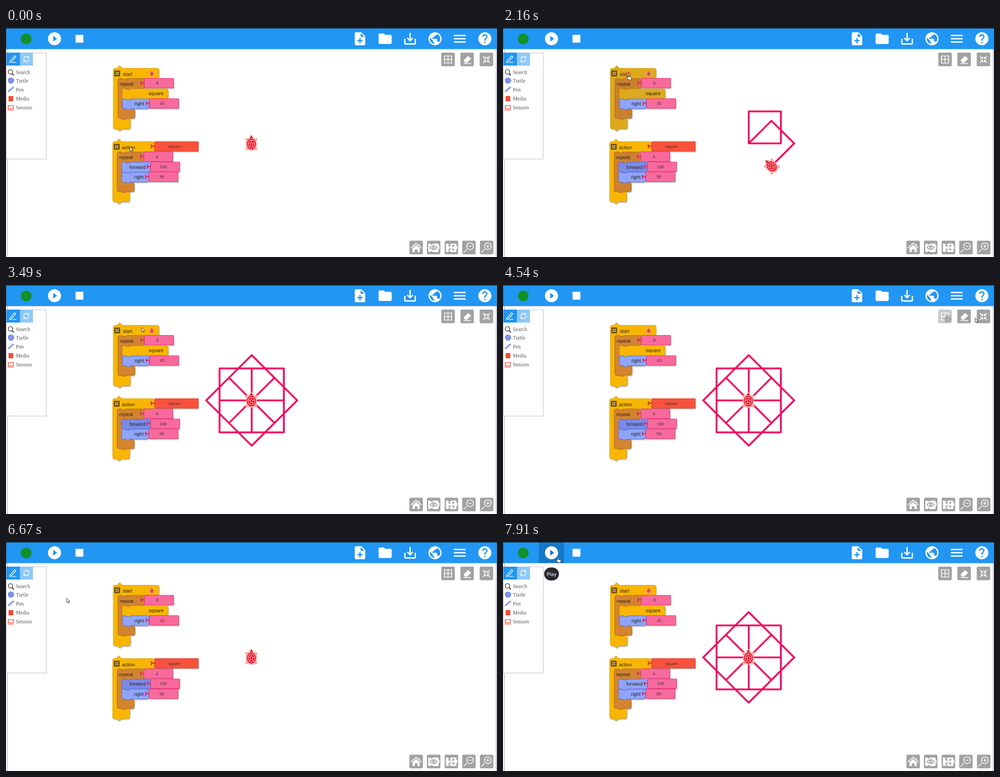
Animation, 1093 px wide and 512 px high, one loop 8.07 s. Source, as an HTML page:

```html
<!DOCTYPE html>
<html lang="en">
<head>
<meta charset="utf-8">
<title>Turtle squares</title>
<style>
  html, body { margin: 0; width: 100%; height: 100%; overflow: hidden; background: #fff; }
  svg { display: block; width: 1093px; height: 512px; }
  .label { font: 10.9px "Liberation Sans", Arial, sans-serif; fill: #2a2418; }
  .value { font: 10.8px "Liberation Serif", serif; fill: #40303a; text-anchor: middle; }
  .item { font: 11.6px "Liberation Serif", serif; fill: #555; }
  .tip { font: 11.5px Roboto, sans-serif; fill: #fff; text-anchor: middle; }
  #blocks { filter: drop-shadow(1px 2px 1px rgba(0, 0, 0, .28)); }
  .line { fill: none; stroke: #fff; stroke-width: 1.7; }
</style>
</head>
<body>
<svg id="stage" viewBox="0 0 1093 512" xmlns="http://www.w3.org/2000/svg">
  <defs>
    <g id="turtle">
      <g fill="#f9aaa4" stroke="#f9aaa4" stroke-width="2" stroke-linejoin="round">
        <path d="M0-18L5-9H-5z"/>
        <ellipse cy="2" rx="11.5" ry="14"/>
        <circle cx="-10" cy="-8" r="2.4"/><circle cx="10" cy="-8" r="2.4"/>
        <circle cx="-10" cy="12.5" r="2.4"/><circle cx="10" cy="12.5" r="2.4"/>
      </g>
      <path d="M0-17L3.6-11H-3.6z" fill="#e8102e"/>
      <ellipse cy="2" rx="10" ry="12" fill="#e8102e"/>
      <ellipse cy="2" rx="7.3" ry="8.8" fill="none" stroke="#f9aaa4" stroke-width="1.5"/>
      <path id="shell" fill="none" stroke="#f9aaa4" stroke-width="1.3"/>
    </g>
  </defs>
  <rect width="1093" height="512" fill="#fff"/>
  <rect x="2" y="47" width="2" height="465" fill="#c9c9dc"/>
  <rect x="1090" y="47" width="3" height="465" fill="#d0d0e2"/>

  <path id="trail" fill="none" stroke="#f5055f" stroke-width="4" stroke-linejoin="round" stroke-linecap="round"/>
  <use id="mover" href="#turtle"/>

  <g id="palette">
    <rect x=".5" y="55.5" width="89" height="237.5" fill="#fff" stroke="#b9b9c0"/>
    <rect x="1" y="55" width="30" height="29" fill="#2196f3"/>
    <rect x="31" y="55" width="29" height="29" fill="#8ec8f8"/>
    <path d="M9 74L19 62l3 2.500L12 76l-4 1zM14 78q5-2 9-1" class="line" style="stroke-width:1.4"/>
    <path d="M39.500 69a6 6 0 0 1 10.500-3.500M51 70a6 6 0 0 1-10.500 3.500" class="line"/>
    <path d="M51.500 62.500v5h-5zM39 76.500v-5h5z" fill="#fff"/>
    <circle cx="10" cy="98" r="5" fill="#fff" stroke="#555" stroke-width="1.7"/>
    <path d="M13.500 102l4 4" stroke="#555" stroke-width="2.600"/>
    <path d="M5 114l5-3 6 2 2 5-3 5-7 1-3-5z" fill="#8093f0" stroke="#6376d8"/>
    <path d="M4 143l2-4L16 131l2 2L8 142z" fill="#8fa3ff" stroke="#7083dd" stroke-width=".7"/>
    <rect x="6" y="152" width="10" height="12" rx="1" fill="#f9523c"/>
    <path d="M5 155h12M5 158.500h12M5 162h12" stroke="#d83a20" stroke-width=".8"/>
    <path d="M5 173.500h11.500v7H5zM3.500 183.500h14" fill="none" stroke="#f9523c" stroke-width="1.7"/>
    <g id="items"></g>
  </g>

  <g id="blocks"></g>
  <g id="buttons"></g>
  <g id="gridHover"><rect x="969" y="55" width="30" height="31" rx="3" fill="#fff" opacity=".42"/>
    <circle cx="990" cy="76" r="8" fill="#777" opacity=".45"/></g>
  <circle id="ripple" cx="1027" cy="71" fill="#a5a5ae"/>
  <text id="clean" x="1031" y="102" class="tip" style="font-size:9.3px;fill:#222">Clean</text>

  <rect y="47" width="1093" height="2" fill="#000" opacity=".1"/>
  <rect width="1093" height="47" fill="#2196f3"/>
  <rect id="hover" x="80" y="1" width="56" height="46" fill="#1678c8"/>
  <rect width="1093" height="1" fill="#111"/><rect width="1" height="47" fill="#1a5b91"/>
  <circle cx="45" cy="24.500" r="12" fill="#12902a"/>
  <g id="icons" fill="#fff"></g>
  <g id="play"><rect x="91.500" y="57" width="33" height="29" rx="14.500" fill="#2a2831"/>
    <text x="108" y="75.500" class="tip">Play</text></g>

  <circle id="ring" fill="#f9a08a" fill-opacity=".35" stroke="#e8402a" stroke-width="2"/>
  <g id="cursor" stroke="#222" stroke-width=".9" stroke-linejoin="round" fill="#fff">
    <path id="arrow" d="M0 0V9.500L2.300 7.500 4 11.200 5.500 10.500 3.900 7H6.800z"/>
    <path id="hand" d="M-1 1.200Q0-.6 1.100 1.200V5L6 5.800Q7.200 6.200 7 8L6 12H.5L-2.800 8Q-3-.2-1 6.800z"/>
  </g>
</svg>

<script>
const LOOP = 8070, SIDE = 71.6, HOME = [547, 258];
const $ = id => document.getElementById(id);
const add = (id, html) => $(id).insertAdjacentHTML('beforeend', html);

// --- header icons on a 24 unit grid: centre x, path, id
const DISC = 'M12 2C6.480 2 2 6.480 2 12s4.480 10 10 10 10-4.480 10-10S17.520 2 12 2z';
const ICONS = [
  [108, DISC + 'm-2 14.500v-9l6 4.500-6 4.500z'],
  [163.5, 'M6 6h12v12H6z', 'stop'],
  [788, 'M14 2H6c-1.100 0-2 .9-2 2v16c0 1.100.9 2 2 2h12c1.100 0 2-.9 2-2V8l-6-6zm2 14h-3v3h-2v-3H8v-2h3v-3h2v3h3v2zm-3-7V3.500L18.500 9H13z'],
  [844, 'M10 4H4c-1.100 0-2 .9-2 2v12c0 1.100.9 2 2 2h16c1.100 0 2-.9 2-2V8c0-1.100-.9-2-2-2h-8l-2-2z'],
  [899.5, 'M19 12v7H5v-7H3v7c0 1.100.9 2 2 2h14c1.100 0 2-.9 2-2v-7h-2zm-6 .67l2.590-2.580L17 11.500l-5 5-5-5 1.410-1.410L11 12.670V3h2z'],
  [955, DISC + 'm-1 17.930c-3.950-.49-7-3.850-7-7.930 0-.62.08-1.210.21-1.790L9 15v1c0 1.100.9 2 2 2v1.930zm6.900-2.540c-.26-.81-1-1.390-1.900-1.390h-1v-3c0-.55-.45-1-1-1H8v-2h2c.55 0 1-.45 1-1V7h2c1.100 0 2-.9 2-2v-.41c2.930 1.190 5 4.060 5 7.410 0 2.080-.8 3.970-2.100 5.390z'],
  [1010, 'M3 18h18v-2H3v2zm0-5h18v-2H3v2zm0-7v2h18V6H3z'],
  [1066, DISC + 'm1 17h-2v-2h2v2zm2.070-7.750l-.9.92C13.450 12.900 13 13.500 13 15h-2v-.5c0-1.100.45-2.100 1.170-2.830l1.240-1.260c.37-.36.59-.86.59-1.410 0-1.100-.9-2-2-2s-2 .9-2 2H8c0-2.210 1.790-4 4-4s4 1.790 4 4c0 .88-.36 1.680-.93 2.250z'],
];
for (const [x, d, id = ''] of ICONS)
  add('icons', `<path id="${id}" fill-rule="evenodd" transform="translate(${x - 17.5} 6.500) scale(1.460)" d="${d}"/>`);

// --- grey canvas buttons: centre, line art, solid art
const inward = 'M-8-8l6 6m0-4.500v4.500h-4.500M8-8l-6 6m0-4.500v4.500h4.500M-8 8l6-6m0 4.500v-4.500h-4.500M8 8l-6-6m0 4.500v-4.500h4.500';
const outward = 'M-1.500-1.500l-4-4m0 3v-3h3M1.500-1.500l4-4m0 3v-3h-3M-1.500 1.500l-4 4m0-3v3h3M1.500 1.500l4 4m0-3v3h-3';
const lens = 'M-5 4L-12 11M-5-3a7.500 7.500 0 1 0 15 0a7.500 7.500 0 1 0-15 0M-1-3h7';
const slab = 'M-12-9h5v2h5v-2H9q2 0 2 2v3h2v7h-2v5q0 2-2 2H-2v-2h-5v2h-3q-2 0-2-2z';
const BUTTONS = [
  [984, 70.5, 'M-8-8H8V8H-8zM0-8V8M-8 0H8', ''],
  [1026.5, 70.5, 'M-8 9H9', 'M-8 2L2-8 9-2 0 7h-5z'],
  [1069.5, 70.5, inward, ''],
  [913, 491, 'M-12 1L0-10 12 1M7-8v4', 'M-8 1L0-6 8 1V10H3V4h-6v6h-5z'],
  [952, 491, '', slab],
  [991.5, 491, '', slab],
  [1030.5, 491, lens, ''],
  [1070, 491, lens + 'M2.500-6.500v7', ''],
];
for (const [x, y, line, solid] of BUTTONS)
  add('buttons', `<g transform="translate(${x} ${y})"><rect x="-15" y="-15.500" width="30" height="30.500" rx="3" fill="#a2a2a2"/>
    <path d="${solid}" fill="#fff"/><path d="${line}" class="line"/></g>`);
add('buttons', `<g fill="none" stroke="#909090" stroke-width="1.500"><path d="M944 491q8-9 16 0q-8 9-16 0z"/>
  <circle cx="952" cy="491" r="2.300"/><path transform="translate(991.500 491)" d="${outward}"/></g>`);

['Search', 'Turtle', 'Pen', 'Media', 'Sensors'].forEach((s, i) =>
  add('items', `<text class="item" x="22" y="${i ? 102 + i * 20 : 103}">${s}</text>`));

// --- program blocks
const GOLD = ['#f8b603', '#d79b08'], BROWN = ['#d4842f', '#a9621c'], BLUE = ['#8fa5fb', '#5668cc'],
      PINK = ['#f96a9c', '#e3256d'], RED = ['#f9523c', '#d5301d'];
const shape = (id, d, [fill, edge]) =>
  add('blocks', `<path id="${id}" d="${d}" fill="${fill}" stroke="${edge}" stroke-width=".9"/>`);
const label = (x, y, s, kind = 'label') => add('blocks', `<text class="${kind}" x="${x}" y="${y}">${s}</text>`);

function clamp(id, x, y, w, mouth, foot, colour, tips) {
  const top = tips ? `H${x + 8}l6-6 6 6` : `H${x + 10}v2h9v-2`;
  const end = tips ? `H${x + 20}l-6 4.500-6-4.500` : `H${x + 19}v2h-9v-2`;
  shape(id, `M${x + 4} ${y}${top}H${x + w - 4}q4 0 4 4V${y + 18.5}q0 4-4 4H${x + 29}v2h-9v-2H${x + 14}q-4 0-4 4
    V${y + mouth - 4}q0 4 4 4H${x + 34}q4 0 4 4V${y + foot - 4}q0 4-4 4${end}H${x + 4}q-4 0-4-4V${y + 4}q0-4 4-4z`, colour);
}
function step(id, x, y, w, colour) {
  shape(id, `M${x + 4} ${y}h5v2h9v-2H${x + w - 4}q4 0 4 4v14q0 4-4 4H${x + 18}v2h-9v-2h-5q-4 0-4-4v-14q0-4 4-4z`, colour);
}
function value(x, y, w, s, textX, colour = PINK) {
  shape('', `M${x} ${y}h${w}v21.500h-${w}z`, colour);
  add('blocks', `<path d="M${x - 8.5} ${y + 6}v9h2.500v-3.500h6v-2.500h-6v-3z" fill="${colour[1]}"/>`);
  label(textX, y + 14, s, 'value');
}
function fold(x, y) {
  add('blocks', `<rect x="${x}" y="${y}" width="13" height="13" fill="#6a4d10"/>
    <path transform="translate(${x + 6.5} ${y + 6.5}) scale(.55)" class="line" style="stroke:#f3dfa8" d="${inward}"/>`);
}
clamp('start', 239, 90, 101.5, 113, 135.5, GOLD, true);
clamp('loop1', 249, 113, 58.5, 68, 89, BROWN);
step('call', 259, 136, 102, GOLD);
step('turn', 259, 158.5, 59.5, BLUE);
fold(241, 95);
add('blocks', '<use href="#turtle" transform="translate(324.500 102) scale(.36)"/>');
value(308, 112.5, 65, '8', 337);
value(319.5, 158, 65, '45', 348);
label(260, 106.5, 'start'); label(253, 129, 'repeat'); label(317.5, 150, 'square'); label(286, 173, 'right');

clamp('action', 237.5, 254, 92.5, 112, 134.5, GOLD, true);
clamp('loop2', 247.5, 277.5, 58.5, 67.5, 88.5, BROWN);
step('ahead', 257.5, 300, 64, BLUE);
step('', 257.5, 322.5, 59.5, BLUE);
fold(240, 259);
value(331, 254, 97, 'square', 375, RED);
value(307, 277, 64.5, '4', 336);
value(322, 299.5, 64.5, '100', 350);
value(318, 322, 65, '90', 347);
label(258, 271, 'action'); label(252, 293, 'repeat'); label(274.5, 314.5, 'forward'); label(285, 337, 'right');

let spokes = '';
for (let i = 0; i < 5; i++) {
  const a = i * Math.PI * .4, p = (r, b = a) => [r * Math.sin(b), 2 - r * 1.15 * Math.cos(b)];
  spokes += `M${p(3.4)}L${p(3.4, a + Math.PI * .4)}M${p(3.4)}L${p(7)}`;
}
$('shell').setAttribute('d', spokes);

// --- timing
// id, from, to, colour while lit
const LIT = [
  ['action', 60, 720, '#dcaa1c'], ['ahead', 232, 7150, '#7a8ae8'], ['turn', 1280, 1560, '#7a8ae8'],
  ['call', 1430, 1640, '#dcaa1c'], ['call', 2000, 2740, '#dcaa1c'], ['start', 1680, 2740, '#dcaa1c'],
  ['loop1', 1560, 2740, '#ca7f2e'], ['loop2', 2005, 2700, '#cd802e'],
];
const REST = {};
for (const [id] of LIT) REST[id] = $(id).getAttribute('fill');

// start, ms per side, sides, end of display, sides already there
const RUNS = [[232, 12, 4, 2005, 0], [2005, 21, 32, 5280, 4], [7172, 20.5, 32, LOOP, 0]];
const CLICKS = [[60, 276, 266], [1960, 278, 104], [7150, 118, 29]];
// time, x, y
const PATH = [
  [0, 276, 266], [950, 276, 266], [1080, 279, 244], [1250, 286, 192], [1400, 289, 149], [1580, 284, 121],
  [1730, 280, 108], [1850, 279, 104], [3060, 279, 104], [3240, 278, 98], [3400, 278, 98], [3520, 310, 94],
  [3800, 590, 84], [4050, 840, 78], [4180, 908, 79], [4360, 985, 75], [4540, 1051, 74], [4640, 1051, 76],
  [4900, 1024, 82], [5830, 1024, 82], [5960, 985, 94], [6250, 600, 138], [6500, 230, 156], [6610, 143, 150],
  [6780, 121, 82], [6950, 118, 29], [7450, 118, 28], [7700, 122, 34], [LOOP, 122, 34],
];

const within = (t, a, b) => t >= a && t < b;
const ramp = (t, a, b) => Math.min(1, Math.max(0, (t - a) / (b - a)));
const show = (id, on) => { $(id).style.display = on ? '' : 'none'; };

function pointer(t) {
  const i = PATH.findIndex(p => p[0] > t), [a, x, y] = PATH[i - 1], [b, u, v] = PATH[i];
  const k = (t - a) / (b - a);
  return [x + (u - x) * k, y + (v - y) * k];
}

function walk(sides) {
  let [x, y] = HOME, d = `M${x} ${y}`;
  for (let i = 0; i < sides; i++) {
    const a = (45 * (i >> 2) + 90 * (i % 4)) * Math.PI / 180;
    x += SIDE * Math.sin(a);
    y -= SIDE * Math.cos(a);
    d += `L${x.toFixed(2)} ${y.toFixed(2)}`;
  }
  const last = sides - 1;
  const heading = sides && sides < 32 ? 45 * (last >> 2) + 90 * (last % 4 + 1) : 0;
  return { x, y, heading, d };
}

function draw(t) {
  const run = RUNS.find(r => within(t, r[0], r[3]));
  const sides = run ? Math.min(run[2], Math.floor((t - run[0]) / run[1])) : 0;
  const pos = walk(sides), drawn = run ? Math.max(sides, run[4]) : 0;
  $('trail').setAttribute('d', drawn ? walk(drawn).d : '');
  $('mover').setAttribute('transform', `translate(${pos.x - .8} ${pos.y - .5}) rotate(${pos.heading})`);

  const playing = within(t, 7150, 7840);
  show('blocks', !playing);
  show('palette', !playing);
  $('stop').setAttribute('fill', playing ? '#f8203c' : '#fff');
  $('blocks').setAttribute('transform', `translate(0 ${t >= 5280 ? 6.5 : 0})`);
  for (const id in REST) {
    const lit = LIT.find(l => l[0] === id && within(t, l[1], l[2]));
    $(id).setAttribute('fill', lit ? lit[3] : REST[id]);
  }

  show('hover', t >= 6920);
  show('play', t >= 6980);
  show('clean', within(t, 4850, 5950));
  $('gridHover').setAttribute('opacity', ramp(t, 4290, 4400) * (1 - ramp(t, 4560, 4800)));
  $('ripple').setAttribute('r', 20 * ramp(t, 5220, 5420));
  $('ripple').setAttribute('opacity', .5 * (1 - ramp(t, 5800, 6050)));

  const click = CLICKS.find(c => within(t, c[0], c[0] + 690));
  show('ring', click);
  if (click) {
    const k = (t - click[0]) / 690;
    $('ring').setAttribute('cx', click[1]);
    $('ring').setAttribute('cy', click[2]);
    $('ring').setAttribute('r', 4 + 5 * k);
    $('ring').setAttribute('opacity', 1 - k * .75);
  }

  const [x, y] = pointer(t);
  const hand = within(t, 90, 3400) || t >= 6860;
  show('hand', hand);
  show('arrow', !hand);
  $('cursor').setAttribute('transform', `translate(${x} ${y})`);
}

const begin = performance.now();
function tick() {
  draw((performance.now() - begin) % LOOP);
  requestAnimationFrame(tick);
}
tick();
</script>
</body>
</html>
```
